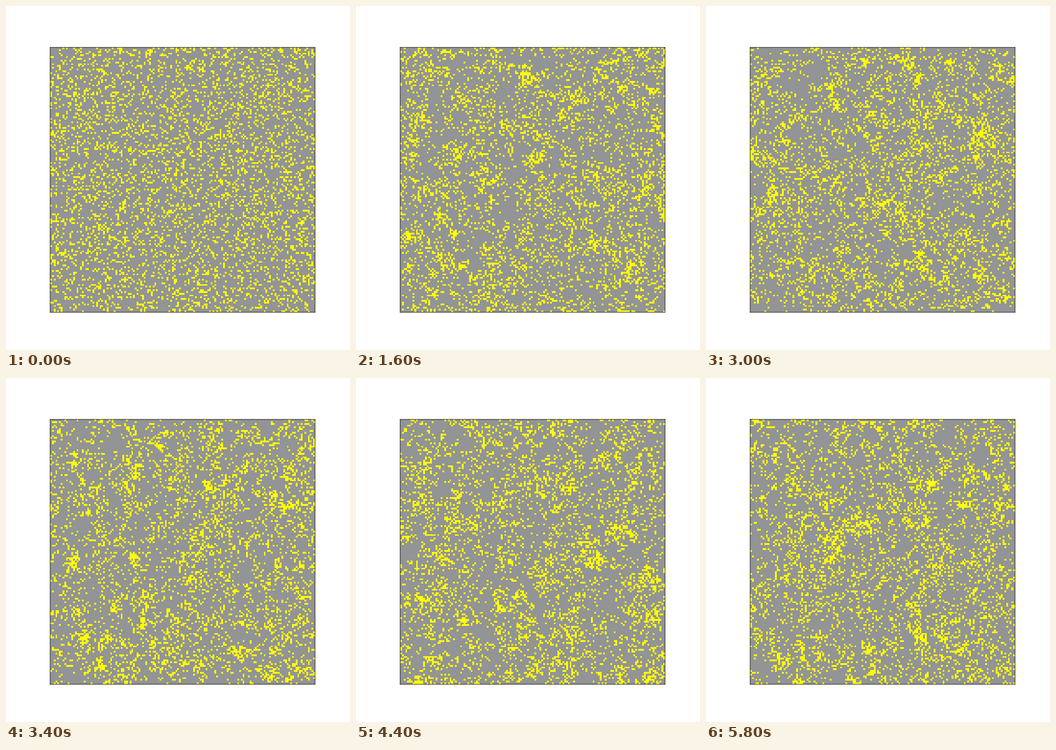
These frames come from a looping animation (748x748 px, 6000 ms). A matplotlib script:

```python
import numpy as np
import matplotlib.pyplot as plt
from matplotlib.animation import FuncAnimation
from matplotlib.colors import ListedColormap

STAGE, DPI = 748, 100
LEFT, TOP, SIDE = 96, 90, 576   # board in pixels

SIZE = 150          # cells per side
AGENTS = 4350       # occupied cells
FRAMES, INTERVAL = 30, 200
BLUR = 2.1          # cluster radius in cells
MEMORY = 0.72       # how much of the attraction field survives a step
PULL = 0.6          # final clustering strength

rng = np.random.default_rng(11)
freq = np.fft.fftfreq(SIZE)
lowpass = np.exp(-2 * (np.pi * BLUR) ** 2 * (freq[:, None] ** 2 + freq ** 2))


def smooth_noise():
    """Unit-variance random field on a torus."""
    noise = rng.normal(size=(SIZE, SIZE))
    field = np.fft.ifft2(np.fft.fft2(noise) * lowpass).real
    return field / field.std()


def scatter(weight):
    """Place the agents on distinct cells with odds exp(weight)."""
    score = (weight + rng.gumbel(size=weight.shape)).ravel()
    grid = np.zeros(SIZE * SIZE)
    grid[np.argpartition(score, -AGENTS)[-AGENTS:]] = 1
    return grid.reshape(SIZE, SIZE)


def simulate(steps):
    field, grids = smooth_noise(), []
    for k in range(steps):
        grids.append(scatter(PULL * (1 - np.exp(-k / 2.2)) * field))
        field = MEMORY * field + np.sqrt(1 - MEMORY ** 2) * smooth_noise()
    return grids


grids = simulate(FRAMES - 1)

fig = plt.figure(figsize=(STAGE / DPI, STAGE / DPI), dpi=DPI)
ax = fig.add_axes([LEFT / STAGE, 1 - (TOP + SIDE) / STAGE,
                   SIDE / STAGE, SIDE / STAGE])
image = ax.imshow(grids[0], cmap=ListedColormap(["#929496", "#ffff00"]),
                  vmin=0, vmax=1, interpolation="nearest", aspect="auto")
ax.set(xticks=[], yticks=[])
for spine in ax.spines.values():
    spine.set(linewidth=72 / DPI, snap=False)


def update(i):
    # the opening state is held for two ticks
    image.set_data(grids[max(0, i - 1)])
    return [image]


anim = FuncAnimation(fig, update, frames=FRAMES, interval=INTERVAL,
                     repeat=True, repeat_delay=0)
plt.show()
```
